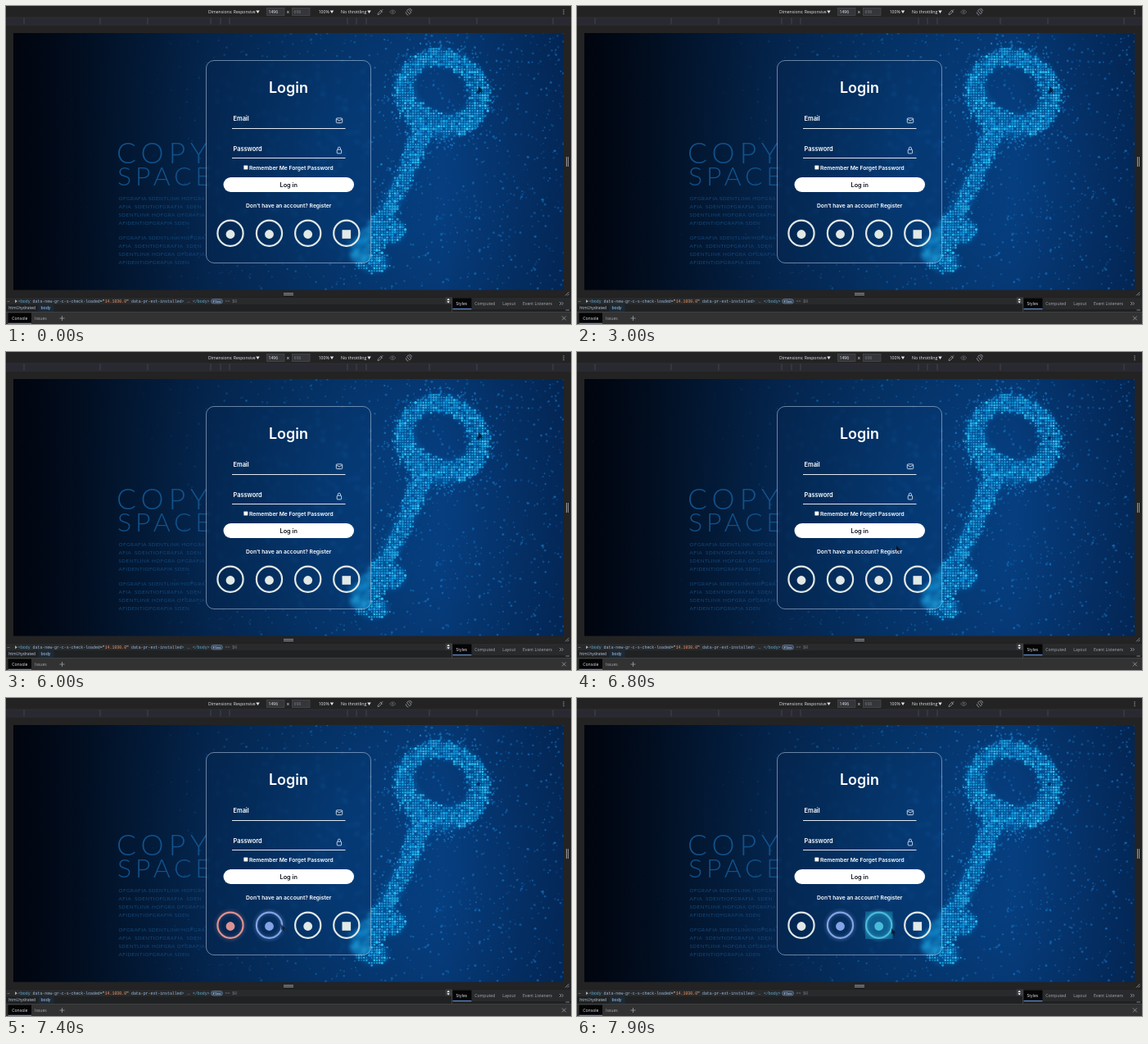
An HTML page with a canvas for the animation above (8 s loop, 690x388 px).

```html
<!DOCTYPE html>
<html lang="en">
<head>
<meta charset="utf-8">
<title>Login form</title>
<style>
  html, body { margin: 0; width: 100%; height: 100%; overflow: hidden; background: #222; }
  #stage { position: absolute; left: 0; top: 0; width: 690px; height: 388px; overflow: hidden; }
  #stage > * { position: absolute; left: 0; top: 0; }
  #stage #card {
    left: 244px; top: 66px; width: 200px; height: 245.5px;
    border: 1px solid rgba(190, 210, 235, .54); border-radius: 10px;
    backdrop-filter: blur(2px);
  }
  text { white-space: pre; }
  .copy text { font-family: Lato, "Open Sans", sans-serif; font-weight: 300; fill: #12518a; }
  .copy #filler text { font-weight: 400; fill: #14497c; }
  .form text { font-family: Inter, "Open Sans", sans-serif; font-weight: 600; fill: #fff; }
  .tools text { font: 5.1px "Open Sans", "Noto Sans", sans-serif; fill: #e4e6ea; }
  .tools .dim { fill: #a6abb2; }
  .tools .code text { font: 4.9px "Liberation Mono", "DejaVu Sans Mono", monospace; }
  .line { fill: none; stroke: #9aa0a6; stroke-width: .8; }
</style>
</head>
<body>
<div id="stage">
  <canvas id="back" width="690" height="388"></canvas>

  <svg class="copy" width="690" height="388">
    <text x="135" y="192" font-size="35.5" letter-spacing="6">COPY</text>
    <text x="136" y="219" font-size="32" letter-spacing="4.8">SPACE</text>
    <g id="filler" font-size="6.3" letter-spacing=".45"></g>
  </svg>

  <div id="card"></div>

  <svg class="form" width="690" height="388">
    <text x="345" y="105.5" font-size="18" text-anchor="middle">Login</text>
    <text x="277.5" y="140" font-size="7.4">Email</text>
    <text x="277.5" y="176.6" font-size="7.4">Password</text>
    <path d="M276 149.5H414.5M276 185.5H414.5" stroke="#dfe7f0"/>
    <g fill="none" stroke="#d5dfec" stroke-width=".9">
      <rect x="403.3" y="136.8" width="7.4" height="5.8" rx="1"/>
      <path d="M403.6 137.7l3.4 2.5 3.4-2.5"/>
      <rect x="404.2" y="175.2" width="5.4" height="4.7" rx=".8"/>
      <path d="M405.3 175v-1.3a1.6 1.6 0 0 1 3.2 0V175"/>
    </g>
    <rect x="290.3" y="194.5" width="5" height="5" rx=".8" fill="#fff" stroke="#777" stroke-width=".5"/>
    <text x="297" y="200.3" font-size="6.7">Remember Me Forget Password</text>
    <rect x="265.5" y="209" width="159.5" height="18" rx="9" fill="#fff"/>
    <text x="345.2" y="220.7" font-size="7.3" text-anchor="middle" style="fill:#10141c">Log in</text>
    <text x="345.2" y="245.9" font-size="6.7" text-anchor="middle">Don't have an account? Register</text>
    <g id="links"></g>
    <path id="pointer" d="M0 0V7.5L1.8 5.9 3 8.6 4.200 8.1 3 5.5H5.4Z" fill="#070b14" opacity=".7"/>
  </svg>

  <svg class="tools" width="690" height="388">
    <path d="M0 0H690V388H0ZM9 33V346.5H681V33Z" fill="#232324" fill-rule="evenodd"/>
    <rect y="14" width="690" height="9" fill="#292a31"/>
    <path d="M0 14H690M0 23.3H690" stroke="#34353a" stroke-width=".6"/>
    <path id="ticks" stroke="#4a4b53" stroke-width=".8"/>

    <text x="247" y="9.1">Dimensions: Responsive</text>
    <rect x="318.5" y="2.5" width="21.5" height="9" fill="#35363a" stroke="#515357" stroke-width=".6"/>
    <text x="320.5" y="9.1">1496</text>
    <text x="342.5" y="9.6" style="font-size:6.5px">×</text>
    <rect x="349.5" y="2.5" width="21.5" height="9" fill="#35363a" stroke="#515357" stroke-width=".6"/>
    <text x="351.5" y="9.1" style="fill:#777b80">698</text>
    <text x="381.7" y="9.1">100%</text>
    <text x="409" y="9.1" style="font-size:5.3px">No throttling</text>
    <path d="M305.3 5.6h4.400l-2.2 3.4zM395.8 5.6h4.400l-2.2 3.4zM441.3 5.6h4.400l-2.2 3.4z" fill="#e4e6ea"/>
    <g class="line">
      <path d="M454 10.5l.4-1.7 3.3-3.3 1.4 1.4-3.3 3.3zM457 4.8l2.7 2.7M458.7 5.9l1.5-1.7"/>
      <path d="M468.5 7.2q3.7-4.6 7.4 0q-3.7 4.6-7.4 0z" stroke="#65696f"/>
      <circle cx="472.2" cy="7.2" r="1" stroke="#65696f"/>
      <path d="M489.5 5.5l2-1.7 3.3 4.2-2 1.8zM488.3 7.3q.2 3.2 3 4M492.5 3q2.9.4 3 3.3"/>
      <path d="M683 353.3l4.500-4.500M685.5 353.3l2-2"/>
    </g>
    <g fill="#b7bbc0">
      <circle cx="681" cy="4.8" r=".65"/><circle cx="681" cy="7.2" r=".65"/><circle cx="681" cy="9.6" r=".65"/>
    </g>
    <path d="M684.5 184v12M686.5 184v12M339 350.5h12M339 352.5h12" stroke="#a0a4aa" stroke-width=".9"/>

    <rect y="355.5" width="690" height="18" fill="#202122"/>
    <rect y="356" width="536" height="8" fill="#292a2c"/>
    <g class="code">
      <text x="1.5" y="361.5" class="dim">⋯</text>
      <path d="M11 358.3v4l3-2z" fill="#a6abb2"/>
      <text x="15" y="362"><tspan fill="#5db0d7">&lt;body </tspan><tspan fill="#9bbbdc">data-new-gr-c-s-check-loaded</tspan>="<tspan fill="#f29766">14.1030.0</tspan>" <tspan fill="#9bbbdc">data-pr-ext-installed</tspan><tspan fill="#5db0d7">&gt;</tspan></text>
      <text x="221.5" y="361.5" class="dim">…</text>
      <text x="228" y="362" style="fill:#5db0d7">&lt;/body&gt;</text>
      <rect x="250.5" y="357.5" width="14" height="5.6" rx="2.8" fill="#3b4d65" stroke="#7892b5" stroke-width=".5"/>
      <text x="252.5" y="361.8" style="font-size:4.2px">flex</text>
      <text x="267.5" y="362" style="fill:#767a80">== $0</text>
    </g>
    <rect x="536.5" y="355.5" width="7.5" height="8" fill="#3c3e42"/>
    <path d="M538.5 359l1.7-2.2 1.7 2.2zM538.5 360.3l1.7 2.2 1.7-2.2z" fill="#fff"/>
    <rect x="39.5" y="364.3" width="19" height="8.7" fill="#1c2a38"/>
    <text x="3.3" y="369.9" style="fill:#bcd4ee;font-size:4.95px">html.hydrated</text>
    <text x="42.5" y="369.9" style="fill:#bcd4ee">body</text>
    <rect x="544.5" y="356" width="145.5" height="14" fill="#292a2c"/>
    <rect x="545.5" y="356.5" width="23" height="13.5" fill="#050506"/>
    <path d="M545.5 369.7h23" stroke="#78a9ec"/>
    <text x="549.5" y="365">Styles</text>
    <text x="572.3" y="365" class="dim">Computed</text>
    <text x="606.3" y="365" class="dim">Layout</text>
    <text x="631" y="365" class="dim">Event Listeners</text>
    <path class="line" d="M676 361l2 2-2 2M678.5 361l2 2-2 2"/>
    <path d="M0 373.5H690M544.5 355.5V373.5" stroke="#46484b" stroke-width=".8"/>
    <rect y="374" width="690" height="14" fill="#323233"/>
    <rect x="2.5" y="374.5" width="28.5" height="13.5" fill="#050506"/>
    <path d="M2.5 387.3h28.5" stroke="#78a9ec"/>
    <text x="7.3" y="383">Console</text>
    <text x="35" y="383" class="dim">Issues</text>
    <path class="line" d="M65.5 381h6M68.5 378v6M679 378.5l4.8 4.8M683.8 378.5l-4.8 4.8M683.5 371h4.5"/>
  </svg>
</div>

<script>
const NS = "http://www.w3.org/2000/svg";
const $ = id => document.getElementById(id);
const add = (parent, tag, attrs) => {
  const el = document.createElementNS(NS, tag);
  for (const key in attrs) el.setAttribute(key, attrs[key]);
  return parent.appendChild(el);
};

let seed = 71;
const rand = () => {
  seed = (seed * 1664525 + 1013904223) >>> 0;
  return seed / 4294967296;
};

function paintBack() {
  const c = $("back").getContext("2d");
  const fill = (gradient, stops) => {
    stops.forEach(([at, color]) => gradient.addColorStop(at, color));
    c.fillStyle = gradient;
    c.fillRect(9, 33, 672, 314);
  };
  const dot = (x, y, size, color, alpha) => {
    c.globalAlpha = alpha;
    c.fillStyle = color;
    c.beginPath();
    c.arc(x, y, size, 0, 7);
    c.fill();
  };

  fill(c.createLinearGradient(9, 0, 681, 0), [
    [0, "#000205"], [.05, "#010812"], [.2, "#031d3b"], [.35, "#052d5c"],
    [.55, "#05376f"], [.78, "#063e7f"], [1, "#042e64"]
  ]);
  fill(c.createRadialGradient(470, 200, 80, 470, 200, 440), [
    [0, "rgba(1,8,25,0)"], [1, "rgba(1,8,25,.45)"]
  ]);

  // loose specks, denser to the right
  for (let i = 0; i < 1350; i++) {
    const x = 9 + 672 * Math.pow(rand(), .65), y = 33 + 313 * rand();
    const light = Math.min(1, Math.max(.06, (x - 150) / 270));
    dot(x, y, .7 + rand() * .9, "#1878c6", light * (.15 + rand() * .5));
  }

  const ring = new Path2D();
  ring.ellipse(532.5, 106.5, 59, 53.5, .35, 0, 7);
  const hole = new Path2D();
  hole.ellipse(532.5, 102.5, 35, 27.5, .5, 0, 7);
  const blade = new Path2D(
    "M496 146L521 157 500 203 474 259 485 264 489 275 481 288 461 291 457 301 466 307 468 317 458 325 " +
    "440 325 423 310 419 292 434 277 456 246 481 196Z");
  const inKey = (x, y) => c.isPointInPath(blade, x, y) ||
    c.isPointInPath(ring, x, y) && !c.isPointInPath(hole, x, y);

  const glow = new Path2D(ring);
  glow.addPath(hole);
  c.save();
  c.filter = "blur(3px)";
  c.globalAlpha = .45;
  c.fillStyle = "#0870b8";
  c.fill(glow, "evenodd");
  c.fill(blade);
  c.restore();

  const step = 3.15;
  for (let y = 46; y < 330; y += step) {
    for (let x = 412; x < 598; x += step) {
      const wobble = () => (rand() - .5) * 6;
      if (!inKey(x + wobble(), y + wobble()) || rand() < .08) continue;
      dot(x, y, .8 + rand() * .9, rand() < .45 ? "#2fcaf8" : "#12a0e6", .55 + rand() * .45);
    }
  }
  dot(577, 105, 2.2, "#04204a", .75);

  // stray dots along the shaft and around the bow
  for (let i = 0; i < 170; i++) {
    const t = rand(), off = (rand() + rand() - 1) * 38;
    dot(512 - 85 * t + off, 150 + 165 * t, .7 + rand() * .8, "#2290dc", .25 + rand() * .5);
  }
  for (let i = 0; i < 150; i++) {
    const a = rand() * 6.28, r = 55 + rand() * 16;
    dot(533 + r * Math.cos(a), 106 + r * .95 * Math.sin(a), .7 + rand() * .8, "#2290dc", .25 + rand() * .45);
  }
  c.globalAlpha = 1;
}
paintBack();

const filler = [
  "OFGRAFIA SDENTLINK HOFGRA", "AFIA  SDENTIOFGRAFIA  SDEN",
  "SDENTLINK HOFGRA OFGRAFIA", "AFIDENTIOFGRAFIA SDEN"
];
[237.3, 285.3].forEach(top => filler.forEach((line, i) => {
  add($("filler"), "text", { x: 137.5, y: top + i * 10 }).textContent = line;
}));

$("ticks").setAttribute("d", [22, 115, 173, 250, 262, 273]
  .map(x => `M${x} 14.5v8M${690 - x} 14.5v8`).join(""));

// hover amount over time for each round link
const plain = [226, 233, 230];
const links = [
  { x: 274, color: [216, 58, 60], keys: [[6800, 0], [7100, 1], [7200, 1], [7600, 0]] },
  { x: 321.5, color: [80, 125, 228], keys: [[7200, 0], [7400, .65], [7600, 1], [7700, 1], [7900, .65]] },
  { x: 368.7, color: [25, 170, 212], keys: [[7600, 0], [7900, .75]], tint: true },
  { x: 415.8, color: plain, keys: [[0, 0]], square: true }
];
for (const link of links) {
  const g = add($("links"), "g", {});
  if (link.tint) {
    link.panel = add(g, "rect", { x: 352, y: 260.5, width: 33.5, height: 33.5, fill: "#147fae", opacity: 0 });
  }
  link.halo = add(g, "circle", { cx: link.x, cy: 277.3, r: 16, fill: "none", "stroke-width": 4 });
  link.halo.style.filter = "blur(2px)";
  link.ring = add(g, "circle", { cx: link.x, cy: 277.3, r: 15.6, fill: "none", "stroke-width": 2.2 });
  link.mark = link.square
    ? add(g, "rect", { x: link.x - 5.3, y: 273.2, width: 10.6, height: 10.6 })
    : add(g, "circle", { cx: link.x, cy: 278.5, r: 5.4 });
}

const path = [
  [6600, 577, 98], [6700, 540, 128], [6800, 390, 236], [6900, 292, 276],
  [7100, 281, 283], [7200, 338, 277], [7400, 336, 276], [7600, 338, 277], [7900, 384, 281]
];

function sample(keys, t, k = 1) {
  if (t <= keys[0][0]) return keys[0][k];
  for (let i = 1; i < keys.length; i++) {
    const a = keys[i - 1], b = keys[i];
    if (t <= b[0]) return a[k] + (b[k] - a[k]) * (t - a[0]) / (b[0] - a[0]);
  }
  return keys[keys.length - 1][k];
}

function draw(t) {
  for (const link of links) {
    const amount = sample(link.keys, t);
    const color = `rgb(${plain.map((v, i) => Math.round(v + (link.color[i] - v) * amount))})`;
    link.ring.setAttribute("stroke", color);
    link.mark.setAttribute("fill", color);
    link.halo.setAttribute("stroke", color);
    link.halo.setAttribute("opacity", amount * .55);
    if (link.panel) link.panel.setAttribute("opacity", amount * .8);
  }
  $("pointer").setAttribute("transform", `translate(${sample(path, t)} ${sample(path, t, 2)})`);
}

const start = performance.now();
function tick() {
  const t = (performance.now() - start) % 8000;
  draw(Math.floor(t / 100) * 100);
  requestAnimationFrame(tick);
}
tick();
</script>
</body>
</html>
```
